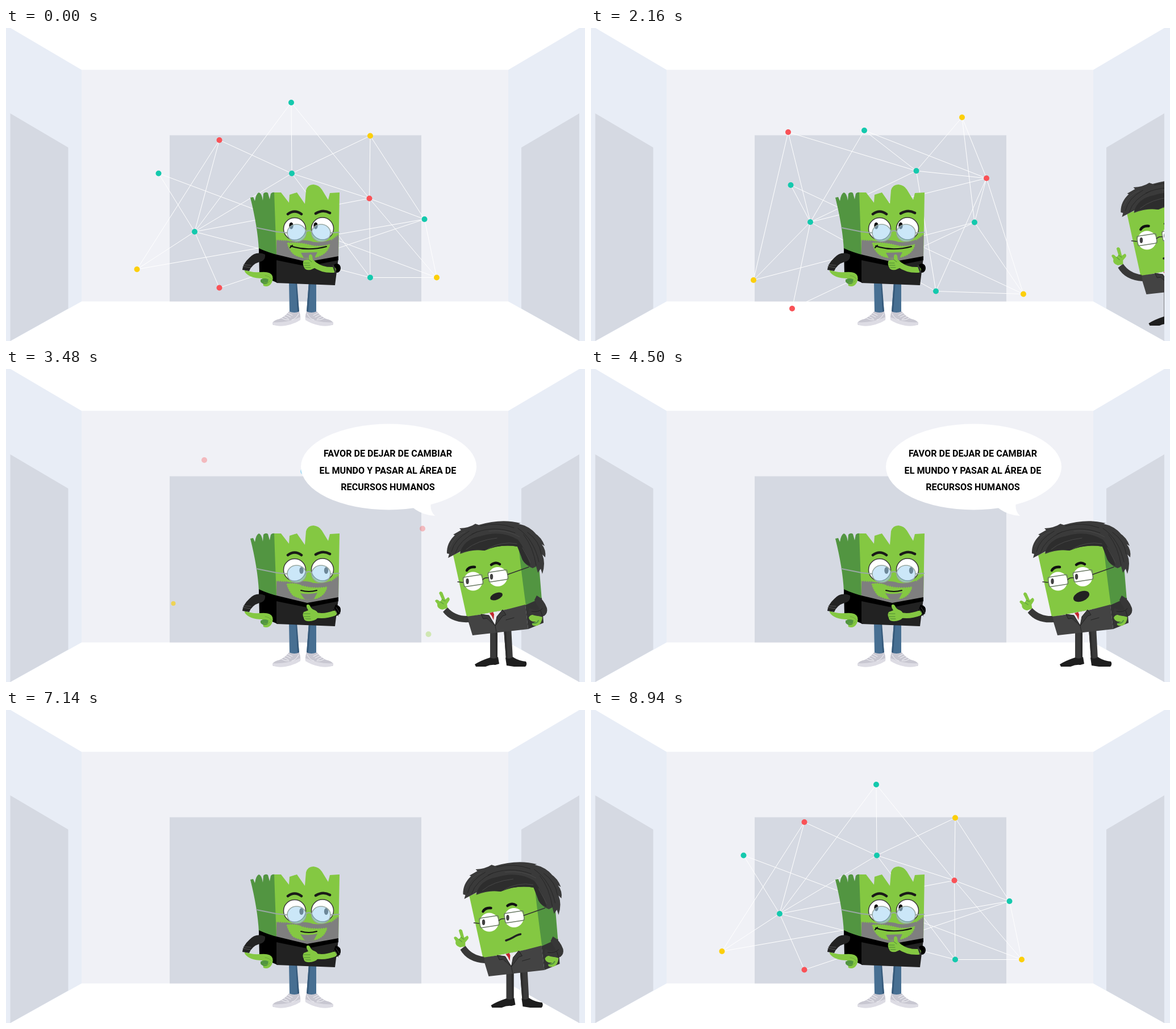
An HTML page for the animation above (9000 ms loop, 1019 by 550 pixels).

```html
<!DOCTYPE html>
<html lang="es">
<head>
<meta charset="utf-8">
<title>Oficina</title>
<style>
  html, body { margin: 0; width: 100%; height: 100%; overflow: hidden; background: #fff; }
  svg { display: block; width: 100%; height: 100%; }
  .speech { font-family: 'Noto Sans CJK JP', Lato, Roboto, sans-serif; font-stretch: 62.5%; font-weight: 600;
    text-anchor: middle; fill: #000; }
  .door { fill: #d5d9e2 }
  .wall { fill: #e8edf6 }
  .lime { fill: #84c842 }
  .moss { fill: #529541 }
  .line { fill: none; stroke-linecap: round; stroke-linejoin: round }
</style>
</head>
<body>
<svg viewBox="0 0 1019 550" preserveAspectRatio="none">
  <defs>
    <clipPath id="doorway"><path d="M0 0H1009V550H0Z"/></clipPath>
    <g id="sneaker">
      <path fill="#c8c7d1" d="M469 518Q472 513 482 511Q492 506 498 498Q508 502 516 498Q519 505 518 513L492 522H470Z"/>
      <path fill="#dddce4" d="M469 517Q492 519 518 508V513Q508 520 492 523Q478 525 469 521Z"/>
      <path class="line" stroke="#f4f4f8" d="M485 510Q492 514 498 513M489 507L497 511M493 504L501 508M496 501L504 505M503 513Q511 511 515 502"/>
    </g>
  </defs>

  <rect width="1019" height="550" fill="#fff"/>
  <path fill="#f0f1f6" d="M133 73.500H884V480.500H133Z"/>
  <path class="wall" d="M0 0H8L133 73.500V480.500L8 550H0ZM1019 0H1009L884 73.500V480.500L1009 550H1019Z"/>
  <path class="door" d="M7.500 150L109.500 210V493L7.500 550ZM1009 150L907 210V493L1009 550ZM288 188.500H731V480.500H288Z"/>

  <g id="edges" stroke="#fff" stroke-width="1"></g>
  <g id="dots"></g>

  <g id="hero">
    <path fill="#476f92" d="M498 446H511L516 499Q508 502 499 499ZM533 446H546V499Q537 502 529 499Z"/>
    <path fill="#365a7b" d="M510 446H512L516 499H513ZM533 446H536L532 499H529Z"/>
    <use href="#sneaker"/>
    <use href="#sneaker" transform="translate(1045) scale(-1 1)"/>

    <path class="moss" d="M430 298L435 297L438 304Q440 291 445 289Q450 290 452 303L453 291Q457 287 461 290L464 301L466 291Q469 288 473 289L477 402L445 390Q443 350 430 298Z"/>
    <path class="lime" d="M472 289H484L498 307L499 293L512 289L526 309L528 285Q531 275 541 275Q551 276 556 284L567 302L570 290L587 289L585 404L530 416L476 402Z"/>
    <path fill="#7f7f7f" d="M476 372L492 373Q506 377 516 373Q530 372 541 376Q560 378 574 371L585.500 362L585 404L530 414L476 401Z"/>
    <path class="line" stroke="#84c842" stroke-width="3" stroke-dasharray="1.500 2" style="stroke-linecap:butt" d="M477 372L492 373M572 372L585 363"/>

    <path fill="#000" d="M445 388L478 400V448L446 434Z"/>
    <path fill="#222" d="M476 402L530 416L585 404L579 452L476 448Z"/>
    <path fill="#000" d="M445 387Q462 395 480 399L530 411L585 401V408L530 419L476 408L445 396Z"/>

    <g id="thinkMouth">
      <path class="lime" stroke="#7f7f7f" stroke-width="2" stroke-dasharray="2 2" d="M494 377Q516 375 537 381Q553 385 571 379Q568 397 548 403Q524 409 507 399Q497 391 494 377Z"/>
      <path class="lime" d="M497 379Q530 385 564 384Q532 391 506 387Z"/>
      <path fill="#7f7f7f" d="M519 395L548 394L543 404H524Z"/>
      <path class="line" stroke="#111" stroke-width="2" d="M501 383Q530 393 564 384M500 386L504 382"/>
    </g>
    <g id="smileMouth">
      <path class="lime" stroke="#7f7f7f" stroke-width="2" stroke-dasharray="2 2" d="M493 377Q510 374 521 380Q542 386 566 382Q563 398 547 404Q524 409 505 399Q497 391 493 377Z"/>
      <path fill="#7f7f7f" d="M518 394Q533 397 548 393L542 404Q533 407 525 404Z"/>
      <path class="line" stroke="#111" stroke-width="2" d="M519 389Q533 393 547 389"/>
    </g>

    <g fill="#fff" stroke="#3a3a38" stroke-width="1.500">
      <circle cx="508" cy="353" r="19.500"/><circle cx="557" cy="352.500" r="19.500"/>
    </g>
    <g fill="#111"><ellipse id="pupilL" rx="3.700" ry="6"/><ellipse id="pupilR" rx="3.700" ry="6"/></g>
    <g fill="#a9d8f3" fill-opacity=".6" stroke="#98a8a3" stroke-width="1.500">
      <ellipse cx="511.500" cy="360" rx="16.500" ry="15"/><ellipse cx="554.500" cy="360" rx="16.500" ry="15"/>
    </g>
    <path class="line" stroke="#98a8a3" stroke-width="2" d="M441 351L476 358L495 360M528 358Q533 354 538 358M571 360L586 359"/>
    <path class="line" stroke="#1a1a18" stroke-width="4.500" d="M496 327Q508 318 520 327M545 326Q558 318 570 325"/>

    <path class="lime" d="M420 425Q432 430 447 429Q466 427 469 436Q471 443 466 450Q461 456 453 453L451 440Q428 440 420 428Z"/>
    <path class="moss" d="M448 442Q456 438 462 442L460 449Q453 452 448 446Z"/>
    <path class="line" stroke="#6bab35" d="M456 435Q464 436 467 441M454 447Q462 449 465 444"/>
    <path fill="#232323" d="M456 398Q440 391 428 404Q417 414 416 425L428 427Q433 415 446 411Q457 409 456 398Z"/>
    <path class="line" stroke="#555" d="M417 419L430 421M418 416L431 417"/>

    <g id="thinkHand">
      <ellipse cx="582" cy="422" rx="7" ry="8" fill="#000"/>
      <path class="line" stroke="#84c842" stroke-width="10" d="M576 425Q557 426 543 416"/>
      <path class="lime" d="M533 413L533 400Q536 395 539 400L540 407L545 411V421L536 425Q526 426 525 421Q522 416 523 411Q523 407 533 407Z"/>
      <path class="line" stroke="#4f8a35" d="M524 413H534M525 417H535M527 421H536M533 407L538 411"/>
      <path class="line" stroke="#333" stroke-width="3" d="M576 418L580 429"/>
    </g>
    <g id="thumbHand">
      <path fill="#000" d="M580 414Q590 416 589 425Q588 433 580 434L576 425Z"/>
      <path class="line" stroke="#84c842" stroke-width="9" d="M578 429Q560 436 543 432"/>
      <path class="lime" d="M532 424Q528 418 529 415Q532 412 535 416Q537 422 544 424Q551 427 549 437Q543 444 530 443Q524 442 524 437Q521 432 524 427Z"/>
      <path class="line" stroke="#4f8a35" d="M524 430H535M524 435H535M527 439H536"/>
      <path class="line" stroke="#444" d="M578 422L585 434M581 419L588 430"/>
    </g>
  </g>

  <g clip-path="url(#doorway)">
    <g id="boss">
      <path fill="#3a3a3a" d="M852 458L865 456V510H852ZM876 456L889 453L892 510H880Z"/>
      <path fill="#2c2c2c" d="M861 458L865 456V510H862ZM876 456L880 455L883 510H880Z"/>
      <path fill="#1e1e1e" d="M825 519Q836 512 852 507Q859 511 866 506L868 518L861 520Q853 519 844 523H827ZM879 507Q886 511 892 506Q902 513 915 514Q918 519 914 523H894L881 521Z"/>

      <path class="moss" d="M900 313L938 345L943 406L913 417Z"/>
      <path class="lime" d="M787 327Q830 306 902 310Q906 350 915 416L811 436Z"/>
      <path fill="#333" d="M914 415L943 402L946 446L919 457Z"/>
      <path fill="#434343" d="M811 435Q860 429 914 414L919 457L821 468Z"/>
      <path fill="#e9e9ec" d="M838 431L875 424L860 450Z"/>
      <path fill="#c3272d" d="M851 429L857 427L859 431L858 441L855 434Z"/>
      <path fill="#3a3a3a" stroke="#232323" d="M836 431L840 439L846 438L861 451L850 433ZM874 423L880 432L874 434L861 451L864 435Z"/>
      <path class="line" stroke="#252525" d="M861 451L863 462M880 441L894 437"/>

      <path class="lime" d="M920 437Q922 431 932 432L944 436Q943 448 935 451Q924 452 926 447L933 444Q922 445 920 437Z"/>
      <path class="line" stroke="#529541" stroke-width="2" d="M927 447Q934 448 937 442"/>
      <path fill="#373737" d="M934 398Q946 404 952 420Q954 429 947 434Q933 436 919 429L921 420Q933 426 939 422L930 406Z"/>
      <path class="line" stroke="#222" d="M944 421Q938 428 925 426M941 425L944 434"/>

      <g id="bossArm">
        <path fill="#383838" d="M769 427L777 419Q790 434 812 434L815 445Q784 447 769 427Z"/>
        <path class="lime" d="M768 423Q758 421 759 413L755 408Q756 404 760 406L764 409L767 405L762 394Q764 389 768 393L773 405L778 401Q782 403 780 407L776 413L777 420Z"/>
        <path class="line" stroke="#529541" d="M764 409L770 413M767 405L773 408"/>
      </g>

      <path fill="#3a3a3a" d="M778 332L780 325L776 324Q775 306 790 292L787 291L801 283L798 280Q816 279 826 272L832 274Q872 262 906 271L902 272Q921 276 933 290L930 288Q943 296 948 311L943 308Q951 318 949 331L944 326Q950 341 944 360L941 351L936 358L933 347L927 350Q911 344 907 330Q904 320 900 312Q870 307 842 319Q821 316 799 325L801 320Z"/>
      <path fill="#2d2d2d" d="M799 323Q806 299 834 294Q872 282 901 300Q914 316 923 346Q909 341 907 330L900 312Q870 307 842 319Q818 316 799 323Z"/>
      <g class="line" stroke="#272727">
        <path d="M784 321Q789 299 815 285M791 323Q798 300 829 286M835 276Q865 268 894 279M820 290Q857 273 896 288M901 280Q929 299 938 339M911 291Q928 313 933 345M918 287Q939 302 942 325"/>
        <path stroke="#484848" d="M810 317Q829 301 864 297M848 316Q872 302 899 307M850 285Q881 281 904 295M781 313Q789 293 808 286M909 314L923 340"/>
      </g>

      <path class="line" stroke="#111" stroke-width="4.500" d="M811 354Q815 347 825 348M854 344Q862 338 869 343"/>
      <g fill="#fff"><circle cx="822" cy="373" r="16.500"/><circle cx="865.500" cy="365" r="17"/></g>
      <g fill="#111"><ellipse cx="812" cy="373" rx="2.700" ry="5"/><ellipse cx="854.500" cy="365" rx="2.700" ry="5"/></g>
      <g fill="#fff" fill-opacity=".2" stroke="#6c7c66" stroke-width="1.500">
        <rect x="-17" y="-8.500" width="34" height="17" rx="3" transform="translate(822 372) rotate(-9)"/>
        <rect x="-17" y="-8.500" width="34" height="17" rx="3" transform="translate(866 363.500) rotate(-9)"/>
      </g>
      <path class="line" stroke="#333" stroke-width="1.500" d="M795 374L804 375M839 370Q843 366 849 367M883 361L920 348"/>
      <ellipse id="talk" rx="16.500" ry="10" fill="#222"/>
      <path id="shut" class="line" stroke="#222" stroke-width="3.500" d="M851.500 405Q858 403 864 399.500Q871 395 877 394"/>
    </g>
  </g>

  <g id="bubble">
    <ellipse cx="673.500" cy="172" rx="154.500" ry="75.500" fill="#fff"/>
    <path fill="#fff" d="M714 242Q732 257 755 258Q744 247 749 232Z"/>
    <g class="speech" id="speech">
      <text x="672" y="148.500" dy=".36em">FAVOR DE DEJAR DE CAMBIAR</text>
      <text x="672" y="178" dy=".36em">EL MUNDO Y PASAR AL ÁREA DE</text>
      <text x="672" y="207.500" dy=".36em">RECURSOS HUMANOS</text>
    </g>
  </g>
</svg>

<script>
const LOOP = 9000;
const $ = id => document.getElementById(id);
const clamp = (v, lo = 0, hi = 1) => Math.min(hi, Math.max(lo, v));
const span = (t, from, to) => clamp((t - from) / (to - from));
const smooth = u => u * u * (3 - 2 * u);
const mix = (a, b, u) => a + (b - a) * u;
const show = (id, on) => $(id).setAttribute('visibility', on ? 'visible' : 'hidden');
const put = (el, attrs) => { for (const k in attrs) el.setAttribute(k, attrs[k]); };
const add = (parent, tag, attrs) => {
  const el = document.createElementNS('http://www.w3.org/2000/svg', tag);
  put(el, attrs);
  return parent.appendChild(el);
};

// Each node drifts through these points; a fourth point means it lingers while fading.
const TEAL = '#14c9ad', RED = '#f95257', GOLD = '#fccf0a';
const KEYS = [0, 960, 2160, 3480];
const nodes = {
  A: { fill: TEAL, path: [[502, 131], [473, 147], [481, 180], [523, 180]], late: '#2bb8f2' },
  B: { fill: RED, path: [[375.5, 197], [361, 195], [347, 183], [349, 160]] },
  C: { fill: GOLD, path: [[641, 189.5], [636, 172], [653, 157]] },
  D: { fill: TEAL, path: [[268.5, 255.5], [308, 290.5], [351.5, 276]] },
  E: { fill: TEAL, path: [[503, 255.5], [533, 277.5], [572.5, 251]] },
  F: { fill: RED, path: [[639.5, 299.5], [657.5, 275], [696, 264], [733, 280.5]] },
  G: { fill: TEAL, path: [[736.5, 336], [709, 335.5], [675, 341.5]] },
  H: { fill: TEAL, path: [[332, 358], [352, 340.5], [386, 341]] },
  I: { fill: GOLD, path: [[230.5, 424], [245, 452], [286, 443], [294.5, 412]], linger: .65, small: .8 },
  J: { fill: RED, path: [[375.5, 456.5], [381, 481], [354, 493]] },
  K: { fill: TEAL, path: [[641, 438.5], [620, 440], [607, 462.5]] },
  L: { fill: GOLD, path: [[758, 438.5], [769.5, 450.5], [761, 467.5], [743.5, 466]], late: '#94d436' }
};
const links = 'AE AF AH BE BH BI CE CF CG DH DL EH EF EK FG FH FK FL GI GJ GL HI HJ HK KL'.split(' ')
  .map(pair => ({ ends: [...pair].map(k => nodes[k]), el: add($('edges'), 'line', {}) }));

for (const n of Object.values(nodes)) {
  n.lingers = n.path.length > 3;
  const [, p, q] = n.path;
  if (!n.lingers) n.path.push(q.map((v, i) => v + (v - p[i]) * .6));
  n.el = add($('dots'), 'circle', { r: 5, fill: n.fill });
}

// Hermite curve through the four key points, at rest at both ends.
function drift(path, axis, t) {
  const v = path.map(p => p[axis]);
  const slope = i => i === 0 || i === 3 ? 0 : (v[i + 1] - v[i - 1]) / (KEYS[i + 1] - KEYS[i - 1]);
  const i = t < KEYS[1] ? 0 : t < KEYS[2] ? 1 : 2;
  const d = KEYS[i + 1] - KEYS[i], u = span(t, KEYS[i], KEYS[i + 1]), w = 1 - u;
  return v[i] * w * w * (1 + 2 * u) + v[i + 1] * u * u * (3 - 2 * u)
    + d * u * w * (slope(i) * w - slope(i + 1) * u);
}

function drawNetwork(t) {
  const back = t > 7200;
  const appear = span(t, 7500, 8000);
  const settle = .4 * (1 - smooth(span(t, 7400, 8800)));
  for (const n of Object.values(nodes)) {
    [n.x, n.y] = [0, 1].map(a => back ? mix(n.path[0][a], n.path[1][a], settle) : drift(n.path, a, t));
    const fade = span(t, 2900, n.lingers ? 3480 : 3300);
    const kept = n.lingers ? mix(1, n.linger || .35, fade) * (1 - span(t, 3480, 3800)) : 1 - fade;
    put(n.el, {
      cx: n.x, cy: n.y,
      r: back ? 5 : 5 * mix(1, n.small || 1, fade),
      fill: !back && n.late && fade > .6 ? n.late : n.fill,
      opacity: back ? appear : kept
    });
  }
  $('edges').setAttribute('opacity', back ? appear : 1 - span(t, 2800, 3250));
  for (const { ends: [a, b], el } of links) put(el, { x1: a.x, y1: a.y, x2: b.x, y2: b.y });
}

function drawHero(t) {
  const look = smooth(span(t, 2550, 2750)) - smooth(span(t, 7700, 7900));
  put($('pupilL'), { cx: mix(502, 520, look), cy: mix(347.5, 354, look) });
  put($('pupilR'), { cx: mix(545, 563.5, look), cy: mix(347.5, 354, look) });
  const thinking = look < .5;
  show('thinkMouth', thinking);
  show('thinkHand', thinking);
  show('smileMouth', !thinking);
  show('thumbHand', !thinking);
}

function drawBoss(t) {
  const speed = .467;
  const shift = t < 5000 ? Math.max(0, 2496 - t) * speed : Math.max(0, t - 7080) * speed;
  put($('boss'), { transform: `translate(${shift})`, visibility: shift < 275 ? 'visible' : 'hidden' });

  const waves = span(t, 2931, 6431) * 5;
  const angle = -1.9 + 9.3 * Math.cos(waves * 2 * Math.PI);
  $('bossArm').setAttribute('transform', `rotate(${angle} 815 440)`);

  const talking = t > 2800 && t < 6820;
  const open = .5 - .5 * Math.cos((t - 3480) / 600 * 2 * Math.PI);
  $('talk').setAttribute('transform',
    `translate(863 399.500) rotate(-22) scale(${mix(.7, 1, open)} ${mix(.58, 1, open)})`);
  show('talk', talking);
  show('shut', !talking);
}

const backIn = (u, c) => u * u * ((c + 1) * u - c);

function drawBubble(t) {
  const size = t < 5000 ? 1 - backIn(1 - span(t, 2560, 3060), .9) : 1 - backIn(span(t, 6280, 6780), 1);
  $('bubble').setAttribute('transform', `translate(675 250) scale(${size}) translate(-675 -250)`);
  show('bubble', size > .001);
}

// Set the speech in the narrowest available family, as large as the bubble allows.
function setSpeech() {
  const speech = $('speech'), size = 23, room = 241;
  const widthIn = family => {
    speech.style.font = `600 ${size}px '${family}', sans-serif`;
    speech.style.fontStretch = '62.5%';
    return Math.max(...[...speech.children].map(line => line.getComputedTextLength()));
  };
  const families = ['Noto Sans CJK JP', 'Open Sans', 'Roboto', 'Lato', 'Noto Sans', 'Inter'];
  const best = families.reduce((a, b) => widthIn(b) < widthIn(a) ? b : a);
  speech.style.fontSize = Math.min(size, size * room / widthIn(best)) + 'px';
}

function draw(now) {
  const t = now % LOOP;
  drawNetwork(t);
  drawHero(t);
  drawBoss(t);
  drawBubble(t);
}

setSpeech();
const start = performance.now();
function tick() {
  draw(performance.now() - start);
  requestAnimationFrame(tick);
}
tick();
</script>
</body>
</html>
```
